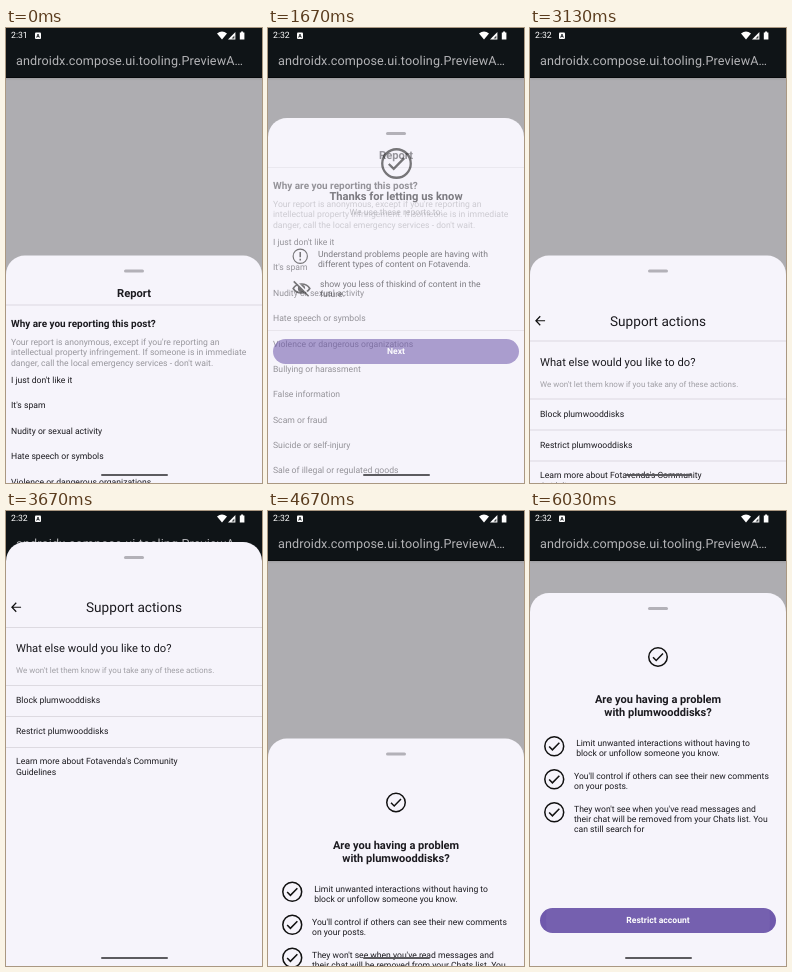
Recreate the animation shown at these times as an HTML page. Size 256 by 455 pixels, loop 6.13 s.

```html
<!DOCTYPE html>
<html lang="en">
<head>
<meta charset="utf-8">
<title>Report sheet</title>
<style>
  html, body { margin: 0; width: 100%; height: 100%; overflow: hidden; background: #aeadb1; }
  #stage {
    position: absolute; left: 0; top: 0; width: 256px; height: 455px; overflow: hidden;
    background: #aeadb1; color: #1b1a1f;
    font-family: Roboto, sans-serif; text-rendering: geometricPrecision;
  }
  #stage div, #stage svg { position: absolute; }
  #bar {
    left: 0; top: 0; width: 256px; height: 50px; background: #0f1417;
    box-shadow: inset 0 -1px #07090b, 0 1px 2px rgba(0, 0, 0, .1);
  }
  #sheet {
    left: 0; top: 0; width: 256px; height: 480px; overflow: hidden;
    background: #f6f4fb; border-radius: 19px 19px 0 0;
  }
  .page { left: 0; top: 0; width: 256px; height: 480px; }
  .grip { left: 118px; top: 14px; width: 20px; height: 2.6px; border-radius: 2px; background: #b3b1b8; }
  .text { white-space: pre; }
  .rule { left: 0; width: 256px; height: 1px; background: #dddae1; }
  .button { height: 25px; border-radius: 13px; overflow: hidden; background: #6f59ac; }
  .ripple { width: 224px; height: 224px; left: 6px; top: -100px; border-radius: 50%; background: #fff; }
  .press { left: 0; top: 143px; width: 256px; height: 31px; background: #000; }
  #pill { left: 94.5px; top: 446.2px; width: 67px; height: 2.3px; border-radius: 2px; background: #5c5b5f; }
</style>
</head>
<body>
<div id="stage">
  <div id="bar"></div>
  <div id="sheet"><div class="grip"></div></div>
  <svg id="status" width="256" height="16" fill="#fff">
    <rect x="29" y="4.5" width="6" height="6.5" rx="1"/>
    <path d="M30.6 9.6L32 6L33.4 9.6M31 8.6H33" fill="none" stroke="#0f1417" stroke-width=".8"/>
    <path d="M211 5.6Q216 1.4 221 5.6L216 11.6Z"/>
    <path d="M222 11.4H229.4V4Z"/>
    <path d="M225.6 10.4H228.4V7.6Z" fill="#0f1417" opacity=".8"/>
    <path d="M233.8 4.6H235.1V3.6H237.1V4.6H238.4V11.6H233.8Z"/>
  </svg>
  <div id="pill"></div>
</div>
<script>
const LOOP = 6130, FRAME = 200 / 3;
const BODY = 8.65, LEAD = 10.2;
const $ = id => document.getElementById(id);
const sheet = $('sheet');

function add(parent, cls, style = {}) {
  const el = document.createElement('div');
  el.className = cls;
  for (const key in style) {
    el.style[key] = typeof style[key] === 'number' && !/opacity|fontWeight/.test(key)
      ? style[key] + 'px' : style[key];
  }
  parent.append(el);
  return el;
}

// y is the middle of the first line; x = null centres the text on the stage
function text(parent, x, y, str, size = BODY, style = {}, lead = LEAD) {
  const place = x === null ? { left: 0, width: 256, textAlign: 'center' } : { left: x };
  const el = add(parent, 'text', {
    ...place, top: y - lead / 2, fontSize: size, lineHeight: lead + 'px', ...style
  });
  el.textContent = str;
  return el;
}

function icon(parent, cx, cy, size, shapes, stroke = 1.5) {
  const box = add(parent, '', { left: cx - size / 2, top: cy - size / 2, width: size, height: size });
  box.innerHTML = `<svg width="${size}" height="${size}" viewBox="0 0 24 24" fill="none"
    stroke="#111" stroke-width="${stroke}">${shapes}</svg>`;
}

const page = () => add(sheet, 'page');
const rule = (parent, y) => add(parent, 'rule', { top: y });
const BOLD = { fontWeight: 700 };
const GREY = { color: '#98979d' };
const CHECK = '<circle cx="12" cy="12" r="9.25"/><path d="M7 12.3L10.2 15.5L17 8.5"/>';
const NOTICE = '<circle cx="12" cy="12" r="9.25"/><path d="M12 6.5V13.2M12 15.2V17.4" stroke-width="2"/>';
const EYE_OFF = `<path d="M1.5 12C6 4.5 18 4.5 22.5 12C18 19.5 6 19.5 1.5 12Z"/>
  <circle cx="12" cy="12" r="3.6" fill="#111"/>
  <path d="M3.8 1.8L22.4 20.4" stroke="#f6f4fb"/><path d="M2.2 3L21 21.8"/>`;

function button(parent, x, y, label) {
  const el = add(parent, 'button', { left: x, top: y, width: 256 - 2 * x });
  text(parent, null, y + 13.2, label, 8.6, { color: '#fff', fontWeight: 600 });
  return el;
}

// Report
const report = page();
text(report, null, 37.8, 'Report', 11.2, BOLD);
rule(report, 48.5);
text(report, 5, 68.8, 'Why are you reporting this post?', 9.96, BOLD);
text(report, 5, 87.3, "Your report is anonymous, except if you're reporting an\n" +
  'intellectual property infringement. If someone is in immediate\n' +
  "danger, call the local emergency services - don't wait.", BODY, GREY);
["I just don't like it", "It's spam", 'Nudity or sexual activity', 'Hate speech or symbols',
  'Violence or dangerous organizations', 'Bullying or harassment', 'False information',
  'Scam or fraud', 'Suicide or self-injury', 'Sale of illegal or regulated goods'
].forEach((label, i) => text(report, 5, 125.2 + i * 25.35, label));

// Thanks
const thanks = page();
icon(thanks, 128, 45.5, 37, CHECK);
text(thanks, null, 78.8, 'Thanks for letting us know', 11.15, BOLD);
text(thanks, null, 95.3, 'We use these reports to:', BODY, GREY);
icon(thanks, 32.5, 138.5, 18.5, NOTICE);
text(thanks, 50, 136.8, 'Understand problems people are having with\n' +
  'different types of content on Fotavenda.', 8.6);
icon(thanks, 33, 170, 19, EYE_OFF, 2);
text(thanks, 52, 166.8, 'show you less of thiskind of content in the\nfuture.', 8.6);
rule(thanks, 212);
button(thanks, 5, 221, 'Next');

// Support actions
const support = page();
icon(support, 10, 65, 14.5, '<path d="M20 12H5M12 4.5L4.8 12L12 19.5"/>', 2);
text(support, null, 66.1, 'Support actions', 13.6);
rule(support, 85);
text(support, 10, 107.5, 'What else would you like to do?', 11.2);
text(support, 10, 128.8, "We won't let them know if you take any of these actions.", 8, { color: '#a09fa5' });
rule(support, 143);
const press = add(support, 'press');
text(support, 10, 159.1, 'Block plumwooddisks');
rule(support, 173.5);
text(support, 10, 189.8, 'Restrict plumwooddisks');
rule(support, 204.5);
text(support, 10, 220.5, "Learn more about Fotavenda's Community\nGuidelines");

// Restrict
const restrict = page();
icon(restrict, 128, 64.4, 24, CHECK);
text(restrict, null, 106.8, 'Are you having a problem\nwith plumwooddisks?', 11.05, BOLD, 13.2);
[[150.8, ' Limit unwanted interactions without having to\n block or unfollow someone you know.'],
 [183.8, "You'll control if others can see their new comments\non your posts."],
 [216.8, "They won't see when you've read messages and\n" +
   'their chat will be removed from your Chats list. You\ncan still search for']
].forEach(([y, str], i) => {
  icon(restrict, 24.5, 153.7 + i * 33, 24.5, CHECK);
  text(restrict, 44, y, str, 8.6);
});
const ripple = add(button(restrict, 10, 314.7, 'Restrict account'), 'ripple');

// Header
text($('bar'), 10, 34, 'androidx.compose.ui.tooling.PreviewA…', 12.6, { color: '#b4b4b7', letterSpacing: '.1px' }, 16);
const clock = text($('stage'), 5, 8.4, '2:31', 8.7, { color: '#fff' });

// Tracks: [time, value] steps
const TRACKS = {
  top: [[620, 227.5], [880, 83], [1000, 90], [1700, 90], [2070, 176], [2400, 176], [2800, 227.5],
    [3440, 227.5], [3800, 0], [4440, 0], [4670, 227.5], [4950, 227.5], [5252, 82]],
  thanks: [[1600, 0], [1720, 1]],
  support: [[2270, 0], [2400, 1]],
  restrict: [[4340, 0], [4460, 1]],
  press: [[4266, 0], [4330, .27]],
  spread: [[5600, 0], [5870, 1]],
  glow: [[5600, 0], [5670, .14], [5870, .14], [6000, .04]]
};
const linear = p => p;
const easeOut = p => 1 - (1 - p) ** 2;

function at(name, t, ease = linear) {
  const steps = TRACKS[name];
  const next = steps.findIndex(s => s[0] > t);
  if (next === 0) return steps[0][1];
  if (next < 0) return steps[steps.length - 1][1];
  const [t0, a] = steps[next - 1], [t1, b] = steps[next];
  return a + (b - a) * ease((t - t0) / (t1 - t0));
}

// The screen refreshes 15 times a second, on 10 ms marks
function snap(t) {
  let n = Math.floor((t + 5) / FRAME);
  if (Math.round(n * FRAME / 10) * 10 > t) n--;
  return n * FRAME;
}

function show(el, alpha) {
  el.style.opacity = alpha;
  el.style.visibility = alpha > 0 ? 'visible' : 'hidden';
}

function draw(now) {
  const t = snap(now % LOOP);
  const a = at('thanks', t), b = at('support', t), c = at('restrict', t);
  sheet.style.transform = `translateY(${Math.round(at('top', t, easeOut) * 2) / 2}px)`;
  show(report, 1 - a);
  show(thanks, a * (1 - b));
  show(support, b * (1 - c));
  show(restrict, c);
  press.style.opacity = at('press', t);
  ripple.style.opacity = c * at('glow', t);
  ripple.style.transform = `scale(${at('spread', t, easeOut)})`;
  clock.textContent = t < 1660 ? '2:31' : '2:32';
}

const start = performance.now();
function tick() {
  draw(performance.now() - start);
  requestAnimationFrame(tick);
}
tick();
</script>
</body>
</html>
```
